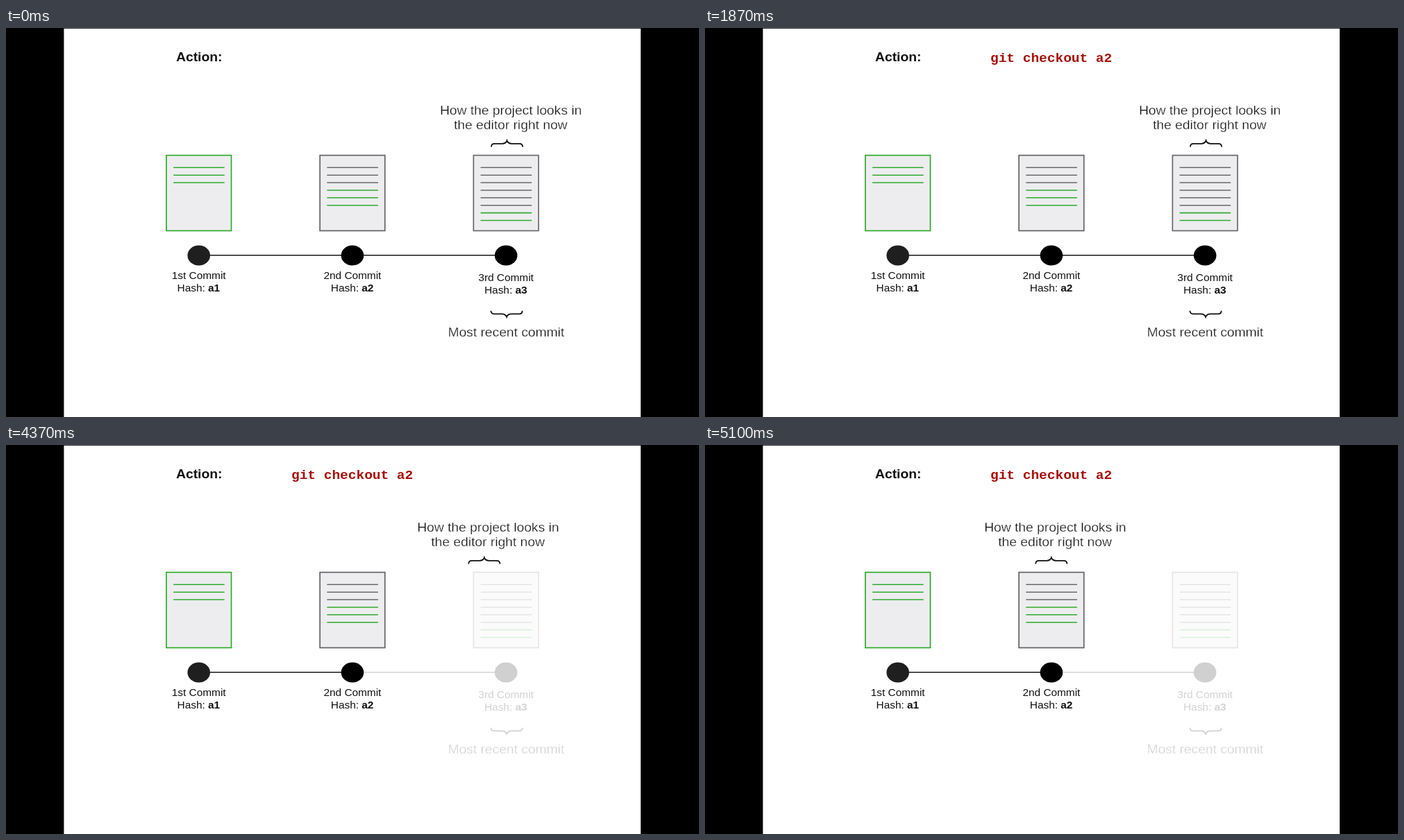
An HTML page for the animation above (7630 ms loop, 998x561 px).

```html
<!DOCTYPE html>
<html lang="en">
<head>
<meta charset="utf-8">
<title>git checkout</title>
<style>
  html, body { margin: 0; width: 100%; height: 100%; overflow: hidden; background: #000; }
  svg { display: block; width: 100vw; height: 100vh; }
  text { font-family: "Liberation Sans", Arial, sans-serif; fill: #111; white-space: pre; }
  .bold { font-weight: 700; }
  .light { stroke: #fff; stroke-width: .32px; }
  .mid { text-anchor: middle; }
  .code { font-family: "Liberation Mono", "Courier New", monospace; font-weight: 700; fill: #a50f0a; }
  .brace { fill: none; stroke: #111; stroke-width: 1.8; }
</style>
</head>
<body>
<svg id="stage" viewBox="0 0 998 561"></svg>
<script>
const LOOP = 7630;
const WIDE = 1.085;       // the slide is shown slightly wider than it is tall
const STEP = 221.2;       // distance between commits
const GREEN = '#2fab2c', GREY = '#69696c';

const text = (x, y, size, cls, content) =>
  `<text transform="translate(${x} ${y}) scale(${WIDE} 1)" font-size="${size}" class="${cls}">${content}</text>`;

const brace = (x, y, dir) =>
  `<path class="brace" transform="translate(${x} ${y}) scale(1 ${dir})"
    d="M-22.6 4.9Q-22.6 .2 -18 .2H-7Q-1.5 .2 0 -4.2Q1.5 .2 7 .2H18Q22.6 .2 22.6 4.9"/>`;

function page(i, border, oldLines, newLines) {
  const x = 230.9 + i * STEP;
  let out = `<rect x="${x}" y="183.6" width="93.6" height="108.8" fill="#ededef" stroke="${border}" stroke-width="1.7"/>`;
  for (let n = 0; n < oldLines + newLines; n++) {
    const color = n < oldLines ? GREY : GREEN;
    out += `<path d="M${x + 10.2} ${201.3 + n * 10.88}h73.6" stroke="${color}" stroke-width="1.6"/>`;
  }
  return out;
}

function commit(i, name, baseline, color) {
  const x = 277.7 + i * STEP;
  return `<ellipse cx="${x}" cy="328" rx="16.3" ry="14.4" fill="${color}"/>` +
    text(x, baseline, 14.2, 'mid', name) +
    text(x - .3, baseline + 18, 14.2, 'mid', `Hash: <tspan class="bold">a${i + 1}</tspan>`);
}

const link = i =>
  `<path d="M${278 + i * STEP} 327.8h${STEP}" stroke="#161616" stroke-width="1.6"/>`;

const stage = document.getElementById('stage');
stage.innerHTML = `
  <rect x="83.4" y=".8" width="830.6" height="560.2" fill="#fff"/>
  ${text(245, 48.4, 17.8, 'bold', 'Action:')}
  <g id="command">${text(411, 48.5, 17.95, 'code', 'git checkout a2')}</g>
  ${page(0, GREEN, 0, 3)}
  ${page(1, '#626267', 3, 3)}
  <g id="lastPage">${page(2, GREY, 6, 2)}</g>
  <g id="lastCommit">
    ${link(1)}
    ${commit(2, '3rd Commit', 365, '#000')}
    ${brace(721, 412.6, -1)}
    ${text(720.3, 444.8, 17.75, 'mid light', 'Most recent commit')}
  </g>
  ${link(0)}
  ${commit(0, '1st Commit', 362.4, '#1f1f1f')}
  ${commit(1, '2nd Commit', 362.4, '#000')}
  <g id="view">
    ${text(727, 125, 17.75, 'mid light', 'How the project looks in')}
    ${text(726.7, 146.4, 17.75, 'mid light', 'the editor right now')}
    ${brace(721.5, 166.6, 1)}
  </g>`;

const [command, lastPage, lastCommit, view] =
  ['command', 'lastPage', 'lastCommit', 'view'].map(id => document.getElementById(id));

const progress = (t, start, end) => Math.min(1, Math.max(0, (t - start) / (end - start)));
const easeOut = (p, power) => 1 - (1 - p) ** power;
const easeInOut = p => p < .5 ? 2 * p * p : 1 - 2 * (1 - p) ** 2;

function draw() {
  const t = performance.now() % LOOP;

  const rise = 40 * (1 - easeOut(progress(t, 1037, 1870), 3));
  command.setAttribute('transform', `translate(0 ${rise})`);
  command.setAttribute('opacity', progress(t, 1037, 1740));

  const fade = easeOut(progress(t, 3167, 4100), 1.5);
  lastPage.setAttribute('opacity', 1 - .83 * fade);
  lastCommit.setAttribute('opacity', 1 - .815 * fade);

  const shift = -222.7 * easeInOut(progress(t, 4100, 5100));
  view.setAttribute('transform', `translate(${shift} 0)`);

  requestAnimationFrame(draw);
}
draw();
</script>
</body>
</html>
```
